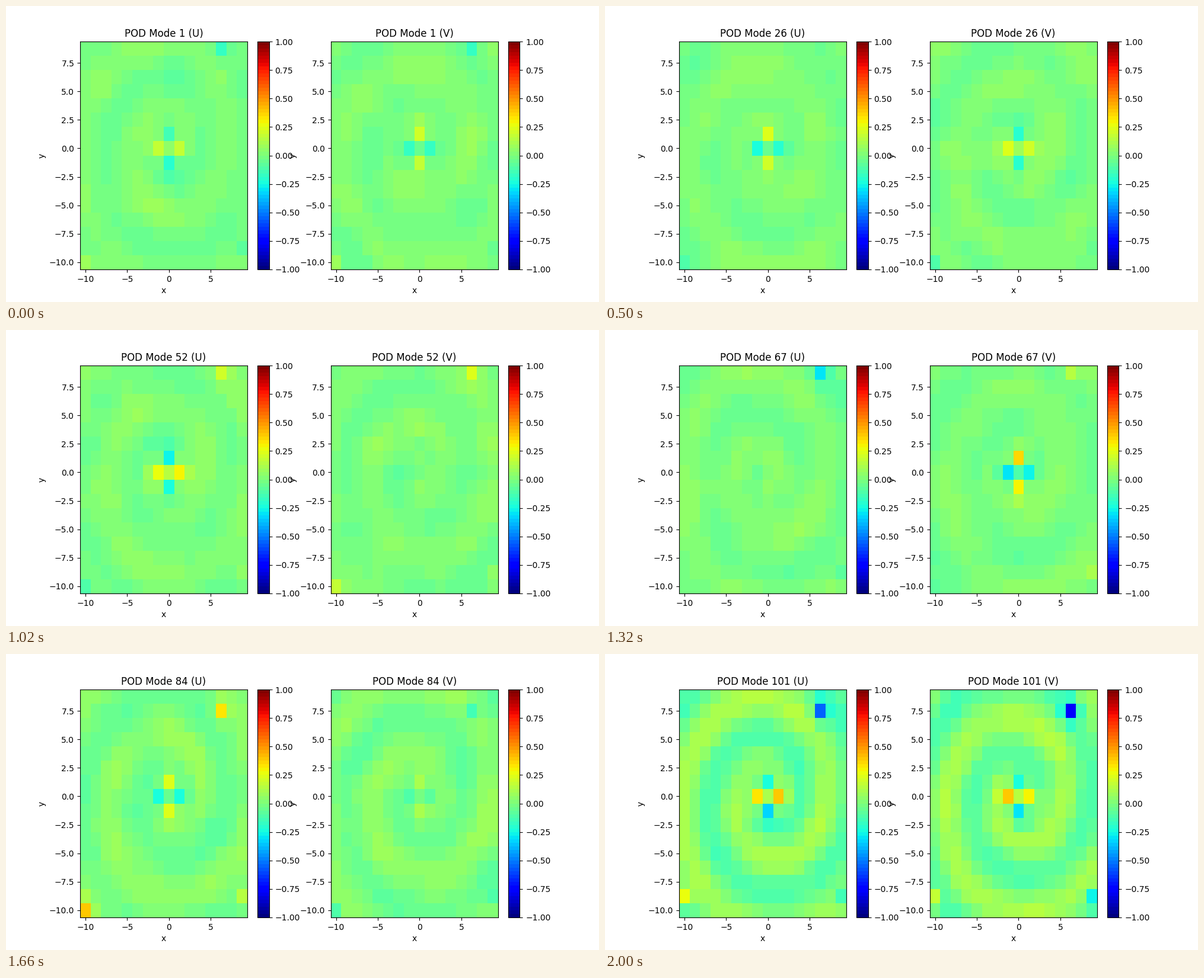
Animation of 1000 by 500 pixels, one loop 2020 ms. Source, as a matplotlib script:

```python
import numpy as np
import matplotlib.pyplot as plt
from matplotlib.animation import FuncAnimation

MODES = 101
N = 16
X = np.linspace(-10, 8.75, N)
Y = X[::-1]  # row 0 lies at the top
GX, GY = np.meshgrid(X, Y)
RADIUS = np.hypot(GX, GY)
ANGLE = np.arctan2(GY, GX)
# lobes right next to the vortex centre
LOBES = np.cos(2 * ANGLE) * np.exp(-((RADIUS - 1.25) / 1.1) ** 2)


def swing(mode, peak, period):
    """Oscillation over the mode number, 1 at the peak."""
    return np.cos(2 * np.pi * (mode - peak) / period)


def spot(x, y, width=0.9):
    return np.exp(-((GX - x) ** 2 + (GY - y) ** 2) / width ** 2)


def smooth(a):
    """Blur with a small kernel, wider along the rows."""
    for axis in (0, 1, 1):
        a = (np.roll(a, 1, axis) + 2 * a + np.roll(a, -1, axis)) / 4
    return a / a.std()


def spiral(mode, part):
    turn = ANGLE - part * np.pi / 2
    drift = 2 * np.pi * (MODES - mode) / 34
    wave = np.cos(2 * np.pi * (RADIUS - 7) / 6.5 - turn + drift)
    return wave * np.clip(RADIUS / 4, 0, 1)


def borders(mode, part, g):
    """Strong cells at the top right, bottom left and bottom right."""
    if part == 0:
        top = (0.15 + 0.35 * g ** 3) * swing(mode, 84, 34)
        low = (0.12 + 0.35 * g ** 2) * swing(mode, 90, 95)
    else:
        top = (0.15 + 0.5 * g ** 3) * swing(mode, 52, 98)
        low = (0.1 + 0.15 * g) * swing(mode, 101, 49)
    return (top * spot(6.25, 7.5 + 1.25 * (g < 0.7))
            + low * spot(-10, -10 + 1.25 * (g > 0.9))
            + 0.5 * top * spot(8.75, -8.75))


def field(mode, part):
    rng = np.random.default_rng(1000 * part + mode)
    g = mode / MODES
    z = (0.035 + 0.075 * g ** 6) * spiral(mode, part)
    z += 0.015 * smooth(rng.normal(size=(N, N)))
    # speckle around the core
    z += 0.04 * g * np.exp(-(RADIUS / 2.6) ** 2) * rng.normal(size=(N, N))

    beat = swing(mode, 32, 75) if part else -swing(mode, 29, 49)
    z += (0.2 + 0.15 * g) * beat * LOBES
    return z + borders(mode, part, g)


fig, axes = plt.subplots(1, 2, figsize=(10, 5), dpi=100)
cmap = plt.get_cmap("jet", 64)
meshes = []
for part, ax in enumerate(axes):
    mesh = ax.pcolormesh(X, Y, field(1, part), cmap=cmap, vmin=-1, vmax=1,
                         shading="nearest")
    fig.colorbar(mesh, ax=ax)
    ax.set_xlabel("x")
    ax.set_ylabel("y")
    meshes.append(mesh)


def update(i):
    mode = i + 1
    for part, (ax, mesh) in enumerate(zip(axes, meshes)):
        mesh.set_array(field(mode, part))
        ax.set_title(f"POD Mode {mode} ({'UV'[part]})")
    return meshes


anim = FuncAnimation(fig, update, frames=MODES, init_func=lambda: update(0),
                     interval=20, repeat=True)
plt.show()
```
